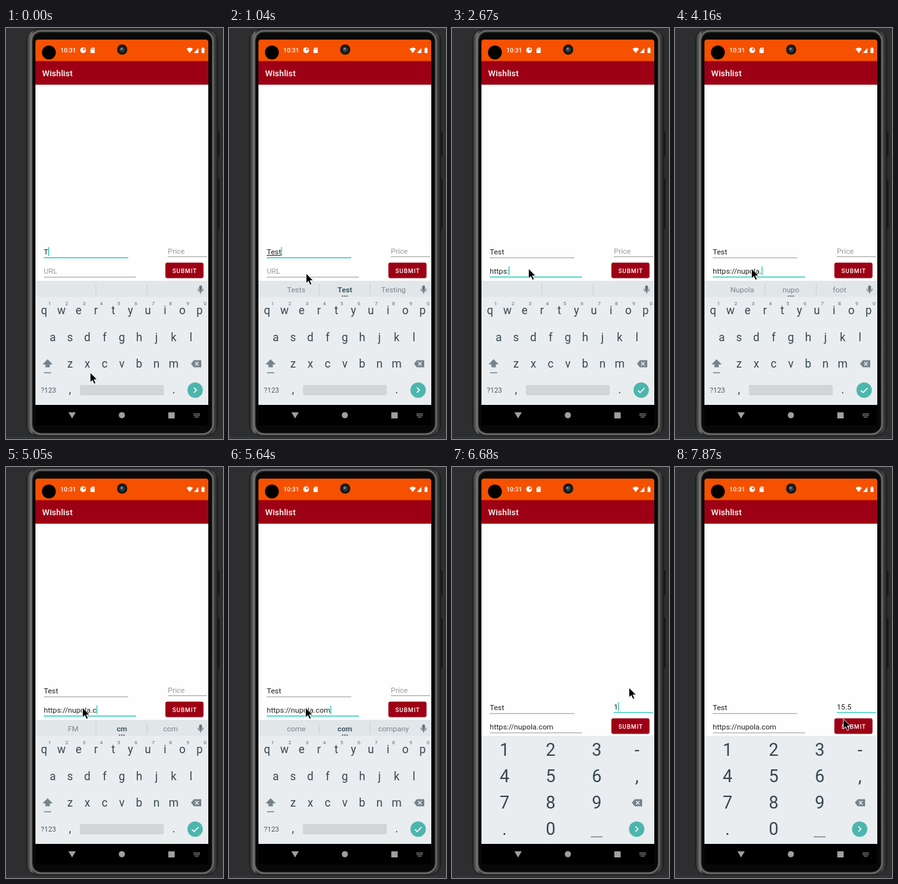
Write an HTML page that moves like this. It is 339x639 px and loops after 8000 ms.

```html
<!DOCTYPE html>
<html lang="en">
<head>
<meta charset="utf-8">
<title>Wishlist</title>
<style>
  html, body { margin: 0; width: 100%; height: 100%; overflow: hidden; background: #2c2e30; }
  svg { display: block; width: 339px; height: 639px; font: 11.7px Roboto, sans-serif; }
  .mid { text-anchor: middle; }
  .medium { font-weight: 500; }
  .key { font-size: 17.5px; fill: #37474f; }
  .digit { font-size: 27px; fill: #37474f; }
  .sup { font-size: 8px; fill: #5d6c74; }
  .hint { fill: #999; }
  .suggest { fill: #7a868c; }
  .suggest.best { font-weight: 700; fill: #455a64; }
</style>
</head>
<body>
<svg viewBox="0 0 339 639">
  <defs>
    <linearGradient id="shell">
      <stop offset="0" stop-color="#1c1d1e"/>
      <stop offset=".01" stop-color="#4a4a4a"/>
      <stop offset=".025" stop-color="#6a6968"/>
      <stop offset=".04" stop-color="#333"/>
      <stop offset=".965" stop-color="#333"/>
      <stop offset=".98" stop-color="#444"/>
      <stop offset="1" stop-color="#1c1d1e"/>
    </linearGradient>
    <g id="backspace">
      <path d="M-8 0l4.5-5.5H8v11H-3.5z" fill="#75838a"/>
      <path d="M-1.5-2.7l5.4 5.4m0-5.4l-5.4 5.4" stroke="#e9edf0" stroke-width="1.4"/>
    </g>
    <path id="next" d="M-2-4l4 4-4 4" fill="none" stroke="#fff" stroke-width="1.6"/>
  </defs>

  <!-- phone body -->
  <rect width="339" height="639" fill="#2c2e30"/>
  <path d="M0 636.5h339" stroke="#3a3c3e"/>
  <path d="M332 161v38M332 235v77" stroke="#141516" stroke-width="3"/>
  <rect x="32" y="1.5" width="299" height="633" rx="19" fill="url(#shell)" stroke="#17181a"/>
  <rect x="38.5" y="4.5" width="285" height="627" rx="16" fill="none" stroke="#727170" stroke-width="2"/>
  <rect x="41.5" y="7" width="280" height="622.5" rx="14" fill="#080808" stroke="#1d1d1d"/>

  <!-- status and title bars -->
  <path d="M46 52V22q0-4 4-4h262q4 0 4 4v30z" fill="#f55100"/>
  <rect x="46" y="51.5" width="270" height="36.5" fill="#9d0014"/>
  <circle cx="67" cy="38" r="10.8"/>
  <circle cx="181.5" cy="33.5" r="8" fill="#17191a"/>
  <circle cx="181.5" cy="33.5" r="4.2" fill="#30383c"/>
  <circle cx="180.7" cy="32.5" r="1.8" fill="#7c8990"/>
  <g fill="#fff">
    <text class="medium" x="85" y="38" font-size="9.6">10:31</text>
    <circle cx="120.5" cy="34.5" r="4.5"/>
    <path d="M120.5 34.5v-2.8h2.8v2.8z" fill="#f55100"/>
    <path d="M134 30.5h4.5v8.5h-6.5v-6z"/>
    <path d="M135 32v1.6m1.7-1.6v1.6" stroke="#f55100" stroke-width=".8"/>
    <path d="M282 32.5q5-4 10 0l-5 6.5zM293.5 39h7v-8z"/>
    <path d="M305.5 31.5h1.3v-1.2h2v1.2h1.3V39h-4.6z"/>
    <text class="medium" x="56.5" y="75" font-size="13.13" letter-spacing=".1">Wishlist</text>
  </g>
  <rect x="46" y="88" width="270" height="330" fill="#fefefe"/>
  <path d="M46 88.5h270" stroke="#d8d8d8"/>

  <!-- form -->
  <g id="form">
    <path id="composing" stroke="#222"/>
    <rect x="249" y="365.8" width="59.5" height="24" rx="3" fill="#000" opacity=".18"/>
    <rect x="249" y="364.7" width="59.5" height="24" rx="3" fill="#9d0014"/>
    <text class="medium" x="260" y="380.5" font-size="9.2" letter-spacing=".82" fill="#fff">SUBMIT</text>
    <rect id="caret" width="1.3" height="14" fill="#1fc8b8"/>
  </g>

  <!-- letter keyboard -->
  <g id="letters">
    <rect x="46" y="393" width="270" height="25" fill="#e1e6e9"/>
    <rect x="46" y="418" width="270" height="169" fill="#e9edf0"/>
    <path d="M140.5 398v17M220.5 398v17" stroke="#c9cfd3"/>
    <g fill="none" stroke="#66747b" stroke-width="1.3">
      <rect x="302.4" y="401" width="3.2" height="7" rx="1.6" fill="#66747b"/>
      <path d="M299.8 405.5a4.2 4.2 0 0 0 8.4 0M304 410v3"/>
    </g>
    <path d="M65 515l8 8h-4.5v4.5h-7V523H57z" fill="#75838a"/>
    <path d="M59.5 536h11" stroke="#75838a" stroke-width="1.5"/>
    <use href="#backspace" x="297" y="522"/>
    <text x="54.5" y="567" font-size="11" fill="#4d5c64">?123</text>
    <rect x="115.5" y="555" width="131" height="16" rx="2" fill="#d1d5d8"/>
    <circle cx="295.5" cy="563" r="12" fill="#4db6ac"/>
    <use id="arrow" href="#next" x="295.5" y="563"/>
    <path id="check" d="M290.5 563.5l3.3 3.3 7-7" fill="none" stroke="#fff" stroke-width="1.6"/>
    <path id="dots" d="M177.5 416.8h0m3.5 0h0m3.5 0h0" stroke="#455a64" stroke-width="2.2" stroke-linecap="round"/>
  </g>

  <!-- number keyboard -->
  <g id="numbers">
    <rect x="46" y="418" width="270" height="169" fill="#e9edf0"/>
    <path d="M217 575h18" stroke="#78868d" stroke-width="1.5"/>
    <use href="#backspace" x="289" y="522"/>
    <circle cx="288.5" cy="563" r="12" fill="#4db6ac"/>
    <use href="#next" x="288.5" y="563"/>
  </g>

  <!-- navigation bar -->
  <rect x="46" y="586" width="270" height="31.5"/>
  <g fill="#a0a0a0">
    <path d="M97.5 597.5H109l-5.8 9.5z"/>
    <circle cx="181" cy="602" r="4.8"/>
    <rect x="253.5" y="597.5" width="10" height="9.5"/>
    <path d="M293 600h10M293 602.5h10M295 605h6" stroke="#a0a0a0" stroke-width="1.4" stroke-dasharray="1.4 .7"/>
  </g>

  <path id="mouse" d="M0 0v15.5l3.6-3.3 2.6 5.8 2.6-1.2-2.6-5.6h5z" stroke="#fff" stroke-width=".9"/>
</svg>

<script>
const LOOP = 8000;
const $ = id => document.getElementById(id);

function add(parent, tag, attrs, text = '') {
  const node = document.createElementNS('http://www.w3.org/2000/svg', tag);
  for (const name in attrs) node.setAttribute(name, attrs[name]);
  node.textContent = text;
  parent.append(node);
  return node;
}
const label = (parent, cls, x, y, text) =>
  add(parent, 'text', { class: cls + ' mid', x, y }, text);
const show = (node, on) => { node.style.display = on ? '' : 'none'; };

[['qwertyuiop', 59.5, 445], ['asdfghjkl', 73, 486.5], ['zxcvbnm', 100, 528]].forEach(([row, x, y]) =>
  [...row].forEach((ch, i) => label($('letters'), 'key', x + 27 * i, y, ch)));
[...'1234567890'].forEach((ch, i) => label($('letters'), 'sup', 68 + 27 * i, 431, ch));
label($('letters'), 'key', 100, 568, ',');
label($('letters'), 'key', 262, 568, '.');
['123-', '456,', '789', '.0'].forEach((row, r) =>
  [...row].forEach((ch, c) => label($('numbers'), 'digit', [82, 154, 226, 289][c], 449 + 41 * r, ch)));

const suggestions = [105, 181, 257].map(x => label($('letters'), 'suggest', x, 411, ''));

const fields = {};
function addField(name, hint, x, right, baseline, lineY) {
  fields[name] = {
    hint, x, baseline,
    line: add($('form'), 'path', { d: `M${x} ${lineY}H${right}` }),
    text: add($('form'), 'text', { x, y: baseline, fill: '#222' }),
  };
}
addField('name', 'Name', 59, 191, 352, 357.3);
addField('url', 'URL', 59, 203, 382, 387.3);
addField('price', 'Price', 252.8, 314, 351, 355.6);
$('form').append($('caret'));

// Each step changes part of the state; "*" marks the bold suggestion.
const steps = [
  [0, { name: 'T', url: '', price: '', focus: 'name', words: '', mouse: [131.5, 535.5], numeric: false, check: false, composing: false }],
  [300, { words: 'The|*T|To', composing: true }],
  [590, { name: 'Te' }],
  [740, { name: 'Tes', words: 'Yes|*Tes|Test' }],
  [890, { name: 'Test', mouse: [126, 450] }],
  [1040, { words: 'Tests|*Test|Testing', mouse: [120.5, 381.5] }],
  [1190, { mouse: [119.5, 374] }],
  [1340, { focus: 'url', composing: false }],
  [1490, { words: '', check: true }],
  [1780, { url: 'h' }],
  [1930, { url: 'ht', words: 'he|*h|have' }],
  [2080, { url: 'htt' }],
  [2220, { url: 'http', words: 'HTTP|*http|https' }],
  [2370, { url: 'https', words: 'HTTPS|*https|those' }],
  [2670, { url: 'https:', words: '' }],
  [2820, { url: 'https:/' }],
  [2970, { url: 'https://' }],
  [3420, { url: 'https://n' }],
  [3570, { url: 'https://nu', words: 'no|*n|not' }],
  [3720, { url: 'https://nup' }],
  [3870, { url: 'https://nupo', words: 'good|*nup|food' }],
  [4010, { url: 'https://nupola', words: 'Nupola|nupo|foot' }],
  [4160, { url: 'https://nupola.' }],
  [4310, { words: '' }],
  [4460, { url: 'https://nupola.c', words: 'C|*c|can' }],
  [4610, { url: 'https://nupola.cm' }],
  [4760, { words: 'FM|*cm|com' }],
  [5050, { url: 'https://nupola.c' }],
  [5200, { words: 'C|*c|can' }],
  [5350, { url: 'https://nupola.co' }],
  [5500, { url: 'https://nupola.com', words: 'so|*co|com' }],
  [5640, { words: 'come|*com|company' }],
  [5790, { mouse: [165, 367] }],
  [5940, { mouse: [232, 355] }],
  [6090, { mouse: [276.5, 347] }],
  [6240, { focus: 'price', mouse: [276.5, 343] }],
  [6540, { numeric: true }],
  [6680, { price: '1' }],
  [7130, { price: '15.' }],
  [7280, { price: '15.5' }],
  [7570, { mouse: [275, 356] }],
  [7720, { mouse: [267, 380] }],
  [7870, { mouse: [263, 391.5] }],
];

function stateAt(t) {
  const state = { edited: 0 };
  for (const [time, change] of steps) {
    if (time > t) break;
    Object.assign(state, change);
    if (['name', 'url', 'price', 'focus'].some(k => k in change)) state.edited = time;
  }
  return state;
}

function render(t) {
  const s = stateAt(t);
  for (const name in fields) {
    const f = fields[name], active = s.focus === name;
    f.text.textContent = s[name] || f.hint;
    f.text.setAttribute('class', s[name] ? '' : 'hint');
    f.line.setAttribute('stroke', active ? '#26cdbd' : '#8e8e8e');
    f.line.setAttribute('stroke-width', active ? 1.4 : 0.9);
  }

  const field = fields[s.focus];
  const width = s[s.focus] ? field.text.getComputedTextLength() : 0;
  $('caret').setAttribute('x', field.x + width);
  $('caret').setAttribute('y', field.baseline - 11.5);
  show($('caret'), (t - s.edited) % 1000 < 500);
  $('composing').setAttribute('d', `M59 353.5h${width}`);
  show($('composing'), s.composing);

  const words = s.words.split('|');
  suggestions.forEach((node, i) => {
    const word = words[i] || '';
    node.textContent = word.replace('*', '');
    node.classList.toggle('best', word.startsWith('*'));
  });
  show($('dots'), s.words);
  show($('check'), s.check);
  show($('arrow'), !s.check);
  show($('letters'), !s.numeric);
  show($('numbers'), s.numeric);
  $('form').setAttribute('transform', `translate(0 ${s.numeric ? 26 : 0})`);
  $('mouse').setAttribute('transform', `translate(${s.mouse})`);
}

const start = performance.now();
function tick() {
  render((performance.now() - start) % LOOP);
  requestAnimationFrame(tick);
}
tick();
</script>
</body>
</html>
```
